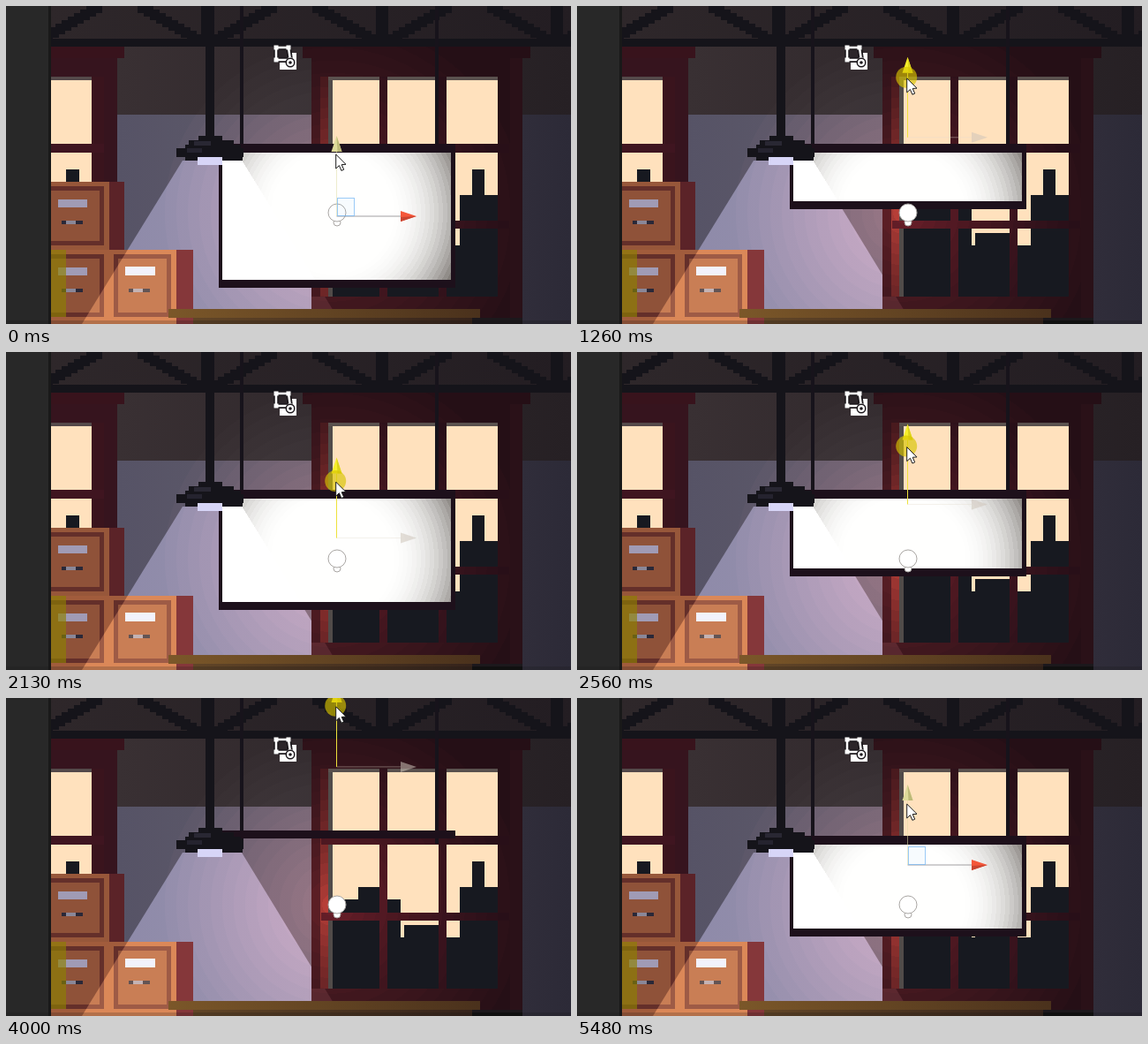
These frames come from a looping animation (640 px wide and 360 px high, 5.91 s). An HTML page with a canvas:

```html
<!DOCTYPE html>
<html>
<head>
<meta charset="utf-8">
<title>Resizing a lit screen</title>
<style>
html, body { margin: 0; width: 100%; height: 100%; overflow: hidden; background: #1c181c; }
canvas { display: block; width: 640px; height: 360px; }
</style>
</head>
<body>
<canvas id="stage" width="640" height="360"></canvas>
<script>
const LOOP = 5910;
const BULB = { x: 375, y: 234 };
const CREAM = '#ffe1bd', NIGHT = '#171920', DARK = '#15141a';
const ctx = document.getElementById('stage').getContext('2d');

// Drags of the handle; grip is the pointer's height relative to it.
const rest = { y: 238, grip: -70 };
const drags = [
  { from: 930, to: 1490, steps: 13, y: 109.5, grip: -65 },
  { from: 1870, to: 2230, steps: 9, y: 226, grip: -63 },
  { from: 2410, to: 2890, steps: 11, y: 71.5, grip: -68 },
  { from: 4000, to: 4560, steps: 13, y: 189, grip: -69 }
];

const ease = u => u - .067 * Math.sin(2 * Math.PI * u) + .037 * Math.sin(Math.PI * u);
const lerp = (a, b, u) => a + (b - a) * u;

function handleAt(t) {
  let last = rest;
  for (const d of drags) {
    if (t < d.from) break;
    const gap = (d.to - d.from) / (d.steps - 1);
    const i = Math.floor((t - d.from) / gap + .25);
    const u = Math.min(1, (i + 1) / d.steps);
    last = { y: lerp(last.y, d.y, ease(u)), grip: lerp(last.grip, d.grip, u) };
  }
  return last;
}

function box(c, fill, x0, y0, x1, y1) {
  c.fillStyle = fill;
  c.fillRect(x0, y0, x1 - x0, y1 - y0);
}

function poly(c, fill, ...pts) {
  c.beginPath();
  for (const [x, y] of pts) c.lineTo(x, y);
  c.closePath();
  c.fillStyle = fill;
  c.fill();
}

function disc(c, x, y, r, fill) {
  c.beginPath();
  c.arc(x, y, r, 0, 7);
  c.fillStyle = fill;
  c.fill();
}

function clipped(c, x0, y0, x1, y1, paint) {
  c.save();
  c.beginPath();
  c.rect(x0, y0, x1 - x0, y1 - y0);
  c.clip();
  paint();
  c.restore();
}

function across(c, x0, a, x1, b) {
  const g = c.createLinearGradient(x0, 0, x1, 0);
  g.addColorStop(0, a);
  g.addColorStop(1, b);
  return g;
}

// Banded radial falloff around the bulb, from one colour to another.
function rings(c, near, far, reach, curve, bands = 16) {
  const x = BULB.x - 5, g = c.createRadialGradient(x, BULB.y, 0, x, BULB.y, reach);
  for (let i = 0; i < bands; i++) {
    const u = curve((i + .5) / bands);
    const color = 'rgb(' + near.map((n, k) => Math.round(lerp(n, far[k], u))) + ')';
    g.addColorStop(i / bands, color);
    g.addColorStop((i + 1) / bands, color);
  }
  return g;
}

function cone(c, fill) {
  c.globalCompositeOperation = 'lighter';
  poly(c, fill, [200, 175], [267, 175], [380, 360], [86, 360]);
  c.globalCompositeOperation = 'source-over';
}

function layer(paint) {
  const el = document.createElement('canvas');
  el.width = 640;
  el.height = 360;
  paint(el.getContext('2d'));
  return el;
}

function glow(c, y0, y1, inner, fill) {
  clipped(c, 50, y0, 585, y1, () => {
    c.globalCompositeOperation = 'lighter';
    for (let r = 190; r > inner; r -= 13) disc(c, BULB.x - 5, BULB.y, r, fill);
  });
}

function drawWall(c) {
  box(c, across(c, 50, '#2e272a', 640, '#231d22'), 0, 0, 640, 46);
  box(c, across(c, 126, '#393033', 640, '#262024'), 0, 46, 640, 123);
  box(c, across(c, 126, '#565366', 346, '#605b6a'), 0, 123, 360, 360);
  box(c, across(c, 585, '#302d3a', 640, '#2c2a37'), 585, 123, 640, 360);
  glow(c, 123, 353, 20, 'rgb(4,2,2)');
  glow(c, 46, 123, 130, 'rgb(2,2,2)');
  cone(c, 'rgb(56,55,67)');
}

function drawTruss(c) {
  for (let post = 30; post < 660; post += 198) {
    box(c, DARK, post - 7, 0, post + 7, 40);
    for (let i = 0; i < 10; i++) {
      for (const side of [-1, 1]) {
        const x = post + side * (70 - i * 7);
        box(c, DARK, x - 9, i * 4, x + 9, i * 4 + 8);
      }
    }
  }
  box(c, DARK, 50, 37, 640, 46);
}

function drawLeftWindow(c) {
  box(c, '#36141e', 51, 46, 126, 280);
  box(c, '#38131c', 51, 46, 134, 59);
  box(c, '#3a141d', 97, 80, 111, 200);
  box(c, '#54494a', 51, 80, 97, 84);
  box(c, CREAM, 51, 84, 97, 156);
  box(c, CREAM, 51, 166, 97, 199);
  box(c, '#3f1520', 51, 156, 111, 166);
  box(c, NIGHT, 68, 185, 83, 199);
}

function drawRightWindow(c) {
  const soft = u => u ** .7;
  const frame = rings(c, [104, 34, 41], [36, 15, 22], 230, soft);
  const jamb = rings(c, [195, 66, 58], [50, 18, 25], 190, soft);
  const bar = rings(c, [112, 32, 42], [38, 15, 24], 200, soft);
  box(c, frame, 346, 46, 585, 353);
  box(c, frame, 336, 46, 594, 59);
  box(c, jamb, 356, 80, 365, 329);
  box(c, '#5a514e', 365, 80, 557, 84);
  box(c, CREAM, 370, 84, 557, 271);
  // Skyline
  box(c, NIGHT, 370, 234, 557, 329);
  box(c, NIGHT, 370, 228, 447, 240);
  box(c, NIGHT, 399, 214, 423, 240);
  box(c, CREAM, 447, 228, 514, 271);
  box(c, NIGHT, 451, 257, 490, 329);
  box(c, NIGHT, 514, 214, 557, 329);
  box(c, NIGHT, 528, 185, 542, 214);
  box(c, '#514b49', 365, 84, 370, 329);
  box(c, bar, 423, 80, 432, 329);
  box(c, bar, 490, 80, 499, 329);
  box(c, bar, 357, 156, 570, 166);
  box(c, bar, 357, 243, 570, 252);
  box(c, '#2a1118', 571, 59, 585, 353);
  clipped(c, 346, 329, 390, 353, () => cone(c, 'rgb(24,16,16)'));
}

function drawer(c, x0, y0, x1, y1) {
  const x = x0 + 8, y = y0 + 10;
  box(c, '#642f2a', x0 - 5, y0 - 5, x1 + 5, y1 + 5);
  box(c, '#8f5239', x0, y0, x1, y1);
  box(c, '#a09bb5', x, y, x + 33, y + 9);
  box(c, '#292838', x + 4, y + 24, x + 28, y + 28);
  box(c, '#8a8798', x + 9, y + 24, x + 20, y + 28);
}

function drawCabinets(c) {
  box(c, '#97573a', 51, 199, 117, 276);
  box(c, '#5b2328', 117, 199, 134, 276);
  drawer(c, 51, 209, 106, 266);
  box(c, '#a15c3c', 51, 276, 193, 360);
  box(c, '#85373a', 193, 276, 212, 360);
  drawer(c, 51, 286, 106, 347);
  drawer(c, 127, 286, 182, 347);
  clipped(c, 51, 199, 117, 276, () => cone(c, 'rgb(58,44,28)'));
  clipped(c, 51, 276, 193, 360, () => cone(c, 'rgb(58,44,28)'));
  box(c, '#f2f2fc', 135, 295, 169, 305);
  box(c, 'rgba(140,128,0,.65)', 51, 276, 68, 352);
}

function drawTable(c) {
  box(c, across(c, 184, '#7b5729', 537, '#4a311c'), 184, 343, 537, 353);
  box(c, across(c, 212, '#614527', 528, '#35231b'), 212, 353, 528, 360);
}

function drawLamp(c) {
  box(c, DARK, 226, 0, 236, 150);
  box(c, DARK, 218, 147, 245, 153);
  box(c, DARK, 207, 152, 258, 158);
  box(c, DARK, 203, 157, 266, 163);
  box(c, DARK, 193, 161, 269, 171);
  box(c, DARK, 203, 170, 268, 175);
  box(c, '#292733', 213, 153, 232, 158);
  box(c, '#25232f', 205, 161, 222, 166);
  box(c, '#d7d5f7', 217, 171, 245, 180);
}

function drawBadge(c) {
  const shape = [[306, 47], [320, 47], [322, 61], [306, 61]];
  box(c, '#fff', 310, 53, 329, 72);
  poly(c, '#2b2529', ...shape);
  c.lineWidth = 6;
  c.strokeStyle = '#1c181c';
  c.stroke();
  c.lineWidth = 2.5;
  c.strokeStyle = '#fff';
  c.stroke();
  for (const [x, y] of shape) box(c, '#fff', x - 2.5, y - 2.5, x + 2.5, y + 2.5);
  disc(c, 322, 64, 5.5, '#1c181c');
  disc(c, 322, 64, 4, '#fff');
  disc(c, 322, 64, 1.8, '#1c181c');
}

const back = layer(c => {
  drawWall(c);
  drawTruss(c);
  drawLeftWindow(c);
  drawRightWindow(c);
  box(c, '#17131b', 265, 0, 269, 165);
  box(c, '#17131b', 486, 0, 490, 165);
  drawCabinets(c);
  drawTable(c);
});

const screenFill = layer(c => {
  const fade = u => Math.max(0, (u * 160 - 60) / 100) ** 2.3;
  c.fillStyle = rings(c, [255, 255, 254], [105, 100, 95], 160, fade, 32);
  c.fillRect(245, 166, 259, 144);
  cone(c, 'rgb(112,112,122)');
});

const front = layer(c => {
  drawLamp(c);
  box(c, '#282828', 0, 0, 48, 360);
  box(c, '#191919', 48, 0, 51, 360);
  box(c, 'rgba(20,20,20,.2)', 0, 356, 640, 360);
  drawBadge(c);
});

function drawScreen(bottom) {
  const sill = bottom - 9;
  box(ctx, '#1d101b', 241, bottom < 166 ? sill : 156, 509, bottom);
  const h = sill - 166;
  if (h > 0) ctx.drawImage(screenFill, 245, 166, 259, h, 245, 166, 259, h);
}

function drawBulb() {
  ctx.strokeStyle = '#a9a6a3';
  ctx.lineWidth = 1;
  for (const [y, r] of [[245, 4], [234, 10]]) {
    disc(ctx, BULB.x, y, r, '#fff');
    ctx.stroke();
  }
}

function drawHandle(y, pressed, square) {
  const x = 374.5;
  box(ctx, pressed ? 'rgba(225,218,205,.4)' : 'rgba(125,120,125,.7)', x, y - .5, 447, y + .5);
  poly(ctx, pressed ? 'rgba(205,196,185,.55)' : '#f4573a', [447, y - 6], [465, y], [447, y + 6]);
  if (!pressed) poly(ctx, '#c94531', [447, y + 1], [465, y], [447, y + 6]);
  box(ctx, pressed ? '#eee23c' : 'rgba(225,220,165,.55)', x - .5, y - 73, x + .5, y);
  poly(ctx, pressed ? '#f7ef2b' : '#dedb9a', [x, y - 91], [x + 6, y - 73], [x - 6, y - 73]);
  poly(ctx, pressed ? '#dcd31b' : '#bdba78', [x, y - 91], [x + 6, y - 73], [x + 1, y - 73]);
  if (square) {
    box(ctx, 'rgba(150,200,255,.08)', 375, y - 20, 394, y);
    ctx.strokeStyle = 'rgba(120,185,245,.75)';
    ctx.lineWidth = 1;
    ctx.strokeRect(375.5, Math.round(y) - 20.5, 19, 20);
  }
}

function drawPointer(x, y) {
  ctx.save();
  ctx.translate(x, y);
  poly(ctx, '#fff', [0, 0], [0, 16], [3.7, 12.6], [6.2, 18.4], [9, 17.2], [6.5, 11.6], [11.3, 11.3]);
  ctx.strokeStyle = '#1b1b1b';
  ctx.lineWidth = 1;
  ctx.stroke();
  ctx.restore();
}

function draw(t) {
  const { y, grip } = handleAt(t);
  const x = 373.7, tip = y + grip;

  ctx.drawImage(back, 0, 0);
  drawScreen(Math.round(y + 81.3));
  ctx.drawImage(front, 0, 0);
  drawBulb();
  drawHandle(y, t >= 620 && t < 4970, t < 620 || t >= 5480);
  if (t >= 490 && t < 4970) disc(ctx, x - .5, tip - 1, 12, 'rgba(215,195,0,.65)');
  drawPointer(x, tip);
}

function tick() {
  draw(performance.now() % LOOP);
  requestAnimationFrame(tick);
}
tick();
</script>
</body>
</html>
```
